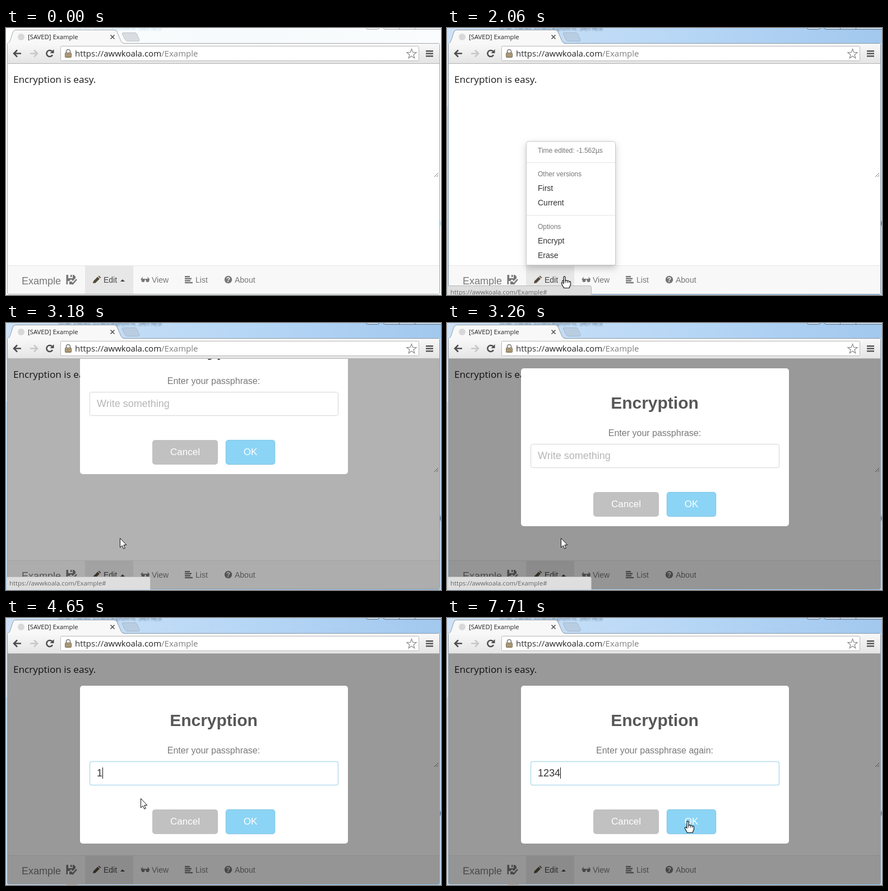
An HTML page with a canvas that plays this animation: 776 px wide and 477 px high, repeating every 8000 ms.

```html
<!DOCTYPE html>
<html lang="en">
<head>
<meta charset="utf-8">
<title>Encryption is easy</title>
<style>
html, body { margin: 0; width: 776px; height: 477px; overflow: hidden; background: #fff; }
canvas { display: block; }
</style>
</head>
<body>
<canvas id="stage" width="776" height="477"></canvas>
<script>
const c = document.getElementById('stage').getContext('2d');
const LOOP = 8000;
const ARIAL = '"Liberation Sans", Arial, sans-serif';
const HUMAN = '"Open Sans", "Noto Sans", sans-serif';

// Progress in n even jumps, the first at a and the last at b.
function steps(t, a, b, n) {
  if (t < a) return 0;
  return Math.min(1, (Math.floor((t - a) / (b - a) * (n - 1) + 1e-6) + 1) / n);
}

// Value of the last [time, value] pair reached.
function at(t, pairs, start) {
  let v = start;
  for (const [time, value] of pairs) if (t >= time) v = value;
  return v;
}

const within = (v, a, b) => v >= a && v < b;

function rect(x, y, w, h, color) {
  c.fillStyle = color;
  c.fillRect(x, y, w, h);
}

function round(x, y, w, h, r, fill, stroke) {
  c.beginPath();
  c.roundRect(x, y, w, h, r);
  if (fill) { c.fillStyle = fill; c.fill(); }
  if (stroke) { c.strokeStyle = stroke; c.lineWidth = 1; c.stroke(); }
}

function text(s, x, y, font, color, align = 'left') {
  c.font = font;
  c.fillStyle = color;
  c.textAlign = align;
  c.fillText(s, x, y);
}

function shape(d, fill, stroke, width = 1) {
  const p = new Path2D(d);
  if (fill) { c.fillStyle = fill; c.fill(p); }
  if (stroke) { c.strokeStyle = stroke; c.lineWidth = width; c.stroke(p); }
}

function gradient(x0, y0, x1, y1, ...colors) {
  const g = c.createLinearGradient(x0, y0, x1, y1);
  colors.forEach((k, i) => g.addColorStop(i / (colors.length - 1), k));
  return g;
}

function shadow(color, blur, dy = 0) {
  c.shadowColor = color;
  c.shadowBlur = blur;
  c.shadowOffsetY = dy;
}

// Mouse moves: start, end, jumps, from x y, to x y, optional bend.
const MOVES = [
  [590, 1360, 11, 649, 474, 229, 446, 480, 375],
  [1420, 1504, 2, 229, 446, 210, 449],
  [2060, 2850, 11, 210, 449, 204, 385],
  [3640, 3950, 4, 204, 385, 241, 323],
  [5560, 5680, 2, 241, 323, 308, 347],
  [5820, 6000, 4, 308, 347, 404, 352],
  [6140, 6230, 2, 404, 352, 429, 362]
];

function mouseAt(t) {
  let m = null;
  for (const k of MOVES) if (t >= k[0]) m = k;
  if (!m) return null;
  const [a, b, n, x0, y0, x1, y1, bx = (x0 + x1) / 2, by = (y0 + y1) / 2] = m;
  const p = steps(t, a, b, n), q = 1 - p;
  return {
    x: Math.round(q * q * x0 + 2 * p * q * bx + p * p * x1),
    y: Math.round(q * q * y0 + 2 * p * q * by + p * p * y1)
  };
}

function desktop(active) {
  rect(0, 0, 776, 477, active
    ? gradient(0, 0, 776, 0, '#cfe2f5', '#b9d8f6', '#a2c8ee')
    : gradient(0, 0, 776, 0, '#fdfefe', '#f6fafc', '#fafcfd'));
  if (active) {
    rect(0, 27, 3, 114, '#dce9f5');
    rect(0, 141, 3, 336, '#c3dbf1');
    rect(773, 27, 3, 450, '#bdd7f0');
  }
  c.save();
  c.filter = 'blur(1.5px)';
  text('the next checkpoint Series', 94, 4, '15px ' + HUMAN,
    active ? 'rgba(50,75,105,.75)' : 'rgba(120,195,225,.55)');
  c.beginPath();
  c.arc(776, 349, 4, 0, 7);
  c.fillStyle = active ? '#6f8ba8' : '#bfe6f0';
  c.fill();
  c.restore();

  const edge = active ? '#5f7387' : '#a9adb2';
  const face = active ? '#c6dcf0' : '#f2f5f7';
  round(642.5, -8.5, 23, 11, 3, face, edge);
  round(673.5, -8.5, 120, 11, 3, face, edge);
  rect(701, 0, 1, 2, edge);
  rect(729, 0, 1, 2, edge);
}

function chrome(active) {
  const line = active ? '#8b9aa8' : '#a5a8aa';
  // window edge and toolbar
  round(2.5, 27.5, 771, 448, 2, '#fff', line);
  rect(3, 28, 770, 36, gradient(0, 28, 0, 64, '#f8f8f8', '#e4e4e4'));
  rect(3, 63, 770, 1, '#b3b3b3');
  // tabs
  shape('M2 27.5C6 27 7 24 8.5 19L12 8Q13.5 3.5 17 3.5H193Q196.5 3.5 198 7L205 23Q207 27.5 211 27.5',
    '#f8f8f8', line);
  rect(3, 27, 206, 2, '#f8f8f8');
  shape('M209 8.5H230Q232.5 8.5 233.5 11L238 21Q238.5 23.5 236 23.5H217Q214 23.5 212.5 21L207.5 11Q206.5 8.5 209 8.5Z',
    active ? '#b9cde2' : '#d9dce0', active ? '#a3b8cc' : '#c0c3c7');
  c.beginPath();
  c.arc(27, 16, 6, 0, 7);
  c.fillStyle = '#d8d8d8';
  c.fill();
  text('[SAVED] Example', 39, 20, '11.3px ' + HUMAN, '#222');
  shape('M186.5 12.5L193.5 19.5M193.5 12.5L186.5 19.5', null, '#555', 1.7);
  // navigation
  const arrow = 'M7 0H-5M0-6L-6 0L0 6';
  for (const [x, flip, color] of [[20, 1, '#4d4d4d'], [50, -1, '#c8c8c8']]) {
    c.save();
    c.translate(x, 45.5);
    c.scale(flip, 1);
    shape(arrow, null, color, 2.6);
    c.restore();
  }
  c.beginPath();
  c.arc(78, 45.5, 5.6, .5, 5.5);
  c.strokeStyle = '#4d4d4d';
  c.lineWidth = 2.5;
  c.stroke();
  shape('M85.5 38V45H78.5Z', '#4d4d4d');
  // address
  round(97.5, 32.5, 639, 26, 2, '#fff', '#b9b9b9');
  shape('M107.5 45V42A3.5 3.5 0 0 1 114.5 42V45', null, '#777', 1.6);
  round(105.5, 44.5, 11, 8, 1, '#b5a380', '#74674c');
  rect(107, 47, 8, 1, '#8d7e60');
  rect(107, 50, 8, 1, '#8d7e60');
  const font = '15px ' + HUMAN;
  let x = 123;
  for (const [s, color] of [['https://', '#333'], ['awwkoala.com', '#222'], ['/Example', '#808080']]) {
    text(s, x, 51, font, color);
    x += c.measureText(s).width;
  }
  let star = '';
  for (let i = 0; i < 10; i++) {
    const r = i % 2 ? 3.8 : 9, a = i * Math.PI / 5 - Math.PI / 2;
    star += (i ? 'L' : 'M') + (723.5 + r * Math.cos(a)) + ' ' + (46.5 + r * Math.sin(a));
  }
  shape(star + 'Z', '#fff', '#8b8b8b', 1.2);
  for (let i = 0; i < 3; i++) rect(749, 40 + i * 4.5, 13, 2.5, '#555');
}

function page(m) {
  rect(3, 64, 770, 411, '#fff');
  text('Encryption is easy.', 13, 98, '17.2px ' + HUMAN, '#1a1a1a');
  shape('M764 266L771 259M768 266L771 263', null, '#777');
  // bottom bar
  rect(3, 424, 770, 51, '#f8f8f8');
  rect(3, 424, 770, 1, '#e7e7e7');
  rect(141, 425, 86, 50, '#e7e7e7');
  const hover = (a, b) => m && m.y > 425 && within(m.x, a, b) ? '#333' : '#777';
  text('Example', 28, 458, '18px ' + ARIAL, '#777');
  shape('M107.5 441H111V447H119V441H121L124 444V447L119 452L116 449L113 452L118 457V458H107.5Z', '#777');
  rect(115, 441, 2.5, 4, '#777');
  rect(110, 452, 3, 6, '#f8f8f8');
  shape('M115 453L119 457L126 449', null, '#777', 2.6);

  const font = '14px ' + ARIAL;
  shape('M155 456L156 452L163.5 444.5L167 448L159.5 455.5ZM164.5 443.5L166 442.5L169.5 446L168 447Z', '#544a38');
  text('Edit', 174, 455, font, '#444');
  shape('M204 453H212L208 449Z', '#444');

  let k = hover(227, 305);
  for (const x of [241.5, 249.5]) round(x, 448, 6, 6, [1, 1, 3, 3], k);
  rect(240.5, 448, 15.5, 1.5, k);
  shape('M241 449L244 445.5M255.5 449L252.500 445.5', null, k, 1.2);
  text('View', 260, 455, font, k);

  k = hover(305, 375);
  [9, 12, 10, 14].forEach((w, i) => rect(319, 443 + i * 3.6, w, 2.4, k));
  text('List', 338, 455, font, k);

  k = hover(375, 460);
  c.beginPath();
  c.arc(396.5, 449.5, 6.7, 0, 7);
  c.fillStyle = k;
  c.fill();
  text('?', 396.5, 454, 'bold 12px ' + ARIAL, '#f8f8f8', 'center');
  text('About', 408, 455, font, k);
}

function menu(m) {
  c.save();
  shadow('rgba(0,0,0,.2)', 12, 5);
  round(141, 202, 160, 222, [4, 4, 0, 0], '#fff');
  c.restore();
  round(141.5, 202.5, 159, 221, [4, 4, 0, 0], '#fff', '#c8c8c8');
  rect(142, 240, 158, 1, '#e5e5e5');
  rect(142, 334, 158, 1, '#e5e5e5');
  const head = '12px ' + ARIAL, item = '14px ' + ARIAL;
  text('Time edited: -1.562µs', 162, 223, head, '#777');
  text('Other versions', 162, 265, head, '#777');
  text('Options', 162, 359, head, '#777');
  for (const [s, y] of [['First', 291], ['Current', 317], ['Encrypt', 385], ['Erase', 411]]) {
    text(s, 162, y, item, m && within(m.y, y - 18, y + 8) ? '#1c1c1c' : '#333');
  }
}

function typed(t) {
  const first = [[4650, '1'], [4770, '12'], [4880, '123'], [5070, '1234']];
  const second = [[6520, ''], [7240, '1'], [7350, '12'], [7600, '123'], [7710, '1234']];
  return at(t, first.concat(second), '');
}

function dialog(t) {
  const dy = at(t, [[3100, -240], [3180, -133], [3260, -40], [3430, 0]], -345);
  const again = t >= 6520;
  c.save();
  c.beginPath();
  c.rect(3, 64, 770, 411);
  c.clip();
  c.translate(0, dy);
  round(132, 121, 478, 282, 5, '#fff');
  text('Encryption', 370.5, 193, 'bold 30px ' + ARIAL, '#575757', 'center');
  text(again ? 'Enter your passphrase again:' : 'Enter your passphrase:',
    370.5, 242, '16px ' + ARIAL, '#797979', 'center');
  // input
  const focus = at(t, [[3530, .4], [3640, .7], [3740, 1], [6520, 0], [6610, .3], [7000, .8], [7240, 1]], 0);
  round(149.5, 256.5, 443, 42, 3, '#fff', '#d4d4d4');
  c.save();
  c.globalAlpha = focus;
  shadow('#c4e6f5', 3);
  round(149.5, 256.5, 443, 42, 3, null, '#b0d9ec');
  c.restore();
  const value = typed(t), font = '18px ' + ARIAL;
  text(value || 'Write something', 162, 283, font, value ? '#333' : '#b6b6b6');
  const caret = at(t, [[3530, 1], [4050, 0], [4470, 1], [5560, 0], [6140, 1], [6520, 0], [6610, 1], [7000, 0], [7240, 1]], 0);
  if (caret) rect(162 + Math.round(c.measureText(value).width), 267, 1, 20, '#111');
  // buttons
  round(261, 342, 117, 44, 5, '#c1c1c1');
  c.save();
  shadow('rgba(140,212,245,.8)', 2);
  round(392, 342, 88, 44, 5, within(t, 6140, 6520) ? '#86cceb' : '#8cd4f5');
  c.restore();
  round(392.5, 342.5, 87, 43, 5, null, 'rgba(0,0,0,.07)');
  text('Cancel', 319.5, 369, '500 17px ' + ARIAL, '#fff', 'center');
  text('OK', 436, 369, '500 17px ' + ARIAL, '#fff', 'center');
  c.restore();
}

function statusBar(t) {
  const alpha = at(t, [[1756, 1], [3430, .6], [3530, .15], [3640, 0]], 0);
  if (!alpha) return;
  const y = Math.round(462 - 8 * steps(t, 2060, 2850, 11));
  c.save();
  c.beginPath();
  c.rect(2, 400, 257, 76 + (y > 454 ? 1 : 0));
  c.clip();
  c.globalAlpha = alpha;
  round(1.5, y - .5, 256, 30, [0, 3, 0, 0], '#dedede', '#b8b8b8');
  text('https://awwkoala.com/Example#', 6, y + 15, '11.3px ' + HUMAN, '#666');
  c.restore();
}

function pointer(t, m) {
  const link = t < 3020
    ? (m.y > 425 ? within(m.x, 141, 460) : t >= 1672)
    : t > 5600 && within(m.y, 342, 386) && (within(m.x, 261, 378) || within(m.x, 392, 480));
  c.save();
  c.lineJoin = 'round';
  if (link) {
    c.translate(m.x + .5, m.y + .5);
    shape('M-1.5 1.5Q0-.8 1.5 1.5V8Q3.5 6.5 5 8.5Q7 7 8 9.5Q11 8.5 11 11V15L8.5 21H-1L-5 13.5Q-6 10.5-3 11.5L-1.5 13Z',
      '#fff', '#111', 1.2);
    shape('M1.5 8V12M5 9V12M8 10V12', null, '#111');
  } else {
    c.translate(m.x - .5, m.y - .5);
    shape('M0 0V16.5L3.8 13L6.3 18.8L8.8 17.7L6.4 12H11.3Z', '#fff', '#111');
  }
  c.restore();
}

function draw(t) {
  const active = t >= 1588;
  const m = mouseAt(t);
  desktop(active);
  chrome(active);
  page(m);
  if (within(t, 1672, 2940)) menu(m);
  const dim = at(t, [[3020, .1], [3100, .2], [3180, .3], [3260, .4]], 0);
  if (dim) rect(3, 64, 770, 411, `rgba(0,0,0,${dim})`);
  if (t >= 3020) dialog(t);
  statusBar(t);
  if (t >= 3430) rect(108, 476, 20, 1, '#d9a98c');
  if (m) pointer(t, m);
}

let start = null;
function tick(now) {
  if (start === null) start = now;
  draw((now - start) % LOOP);
  requestAnimationFrame(tick);
}
draw(0);
requestAnimationFrame(tick);
</script>
</body>
</html>
```
